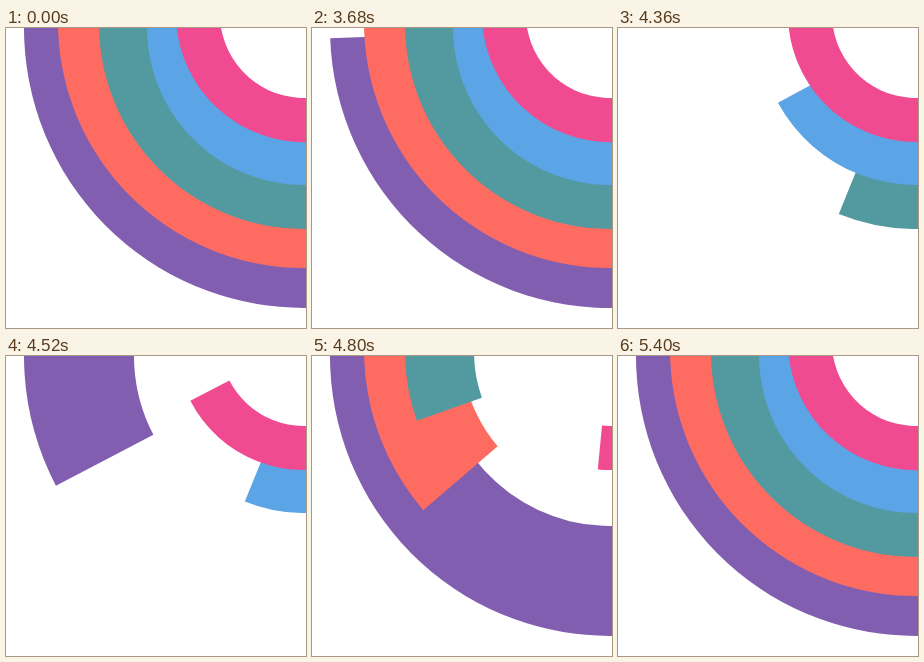
These frames come from a looping animation (300 px wide and 300 px high, 7520 ms). An HTML page with a canvas:

```html
<!DOCTYPE html>
<html lang="en">
<head>
<meta charset="utf-8">
<title>Rainbow rings</title>
<style>
  html, body { margin: 0; width: 100%; height: 100%; overflow: hidden; background: #fff; }
  canvas { display: block; width: 300px; height: 300px; }
</style>
</head>
<body>
<canvas id="stage"></canvas>
<script>
const SIZE = 300, LOOP = 7520, STEP = 40;
const CX = 298, SWEEP = 95, POWER = 1.4;

// Angles are degrees from the left, running down towards the bottom.
// wipe and draw hold [start, duration] in ms; creep is a slow lead-in.
const rings = [
  { color: '#825eb0', cy: 0,   outer: 280, inner: 170, wipe: [3640, 609], draw: [4371, 360] },
  { color: '#fe6b61', cy: -6,  outer: 246, inner: 148, wipe: [3770, 560], draw: [4582, 400] },
  { color: '#529aa0', cy: -4,  outer: 205, inner: 136, wipe: [3951, 520], draw: [4651, 460] },
  { color: '#5ba4e5', cy: 0,   outer: 157, inner: 96,  wipe: [4174, 440], draw: [4878, 340] },
  { color: '#f04b91', cy: -14, outer: 128, inner: 84,  wipe: [4294, 550], draw: [5160, 238],
    creep: { start: 4607, speed: 0.0275 } }
];

const canvas = document.getElementById('stage');
const ctx = canvas.getContext('2d');
const ratio = window.devicePixelRatio || 1;
canvas.width = canvas.height = SIZE * ratio;
ctx.scale(ratio, ratio);

const clamp = u => Math.min(1, Math.max(0, u));
const sweep = (t, [start, duration]) => SWEEP * clamp((t - start) / duration) ** POWER;

function headAngle(ring, t) {
  const { creep, draw } = ring;
  const lead = creep ? Math.max(0, t - creep.start) * creep.speed : 0;
  return Math.min(SWEEP, lead + sweep(t, draw));
}

function drawArc(ring, from, to) {
  if (to <= from) return;
  const rad = a => Math.PI * (1 - a / 180);
  ctx.beginPath();
  ctx.arc(CX, ring.cy, ring.outer, rad(from), rad(to), true);
  ctx.arc(CX, ring.cy, ring.inner, rad(to), rad(from), false);
  ctx.closePath();
  ctx.fillStyle = ring.color;
  ctx.fill();
}

function render(t) {
  ctx.fillStyle = '#fff';
  ctx.fillRect(0, 0, SIZE, SIZE);
  for (const ring of rings) {
    const tail = sweep(t, ring.wipe);
    const head = headAngle(ring, t);
    if (tail === 0 || head >= SWEEP) {
      drawArc(ring, -20, 110);
    } else {
      if (head > 0) drawArc(ring, -20, head);
      if (tail < SWEEP) drawArc(ring, tail, 110);
    }
  }
}

const origin = performance.now();
function tick() {
  const t = (performance.now() - origin) % LOOP;
  render(Math.floor(t / STEP) * STEP);
  requestAnimationFrame(tick);
}
tick();
</script>
</body>
</html>
```
